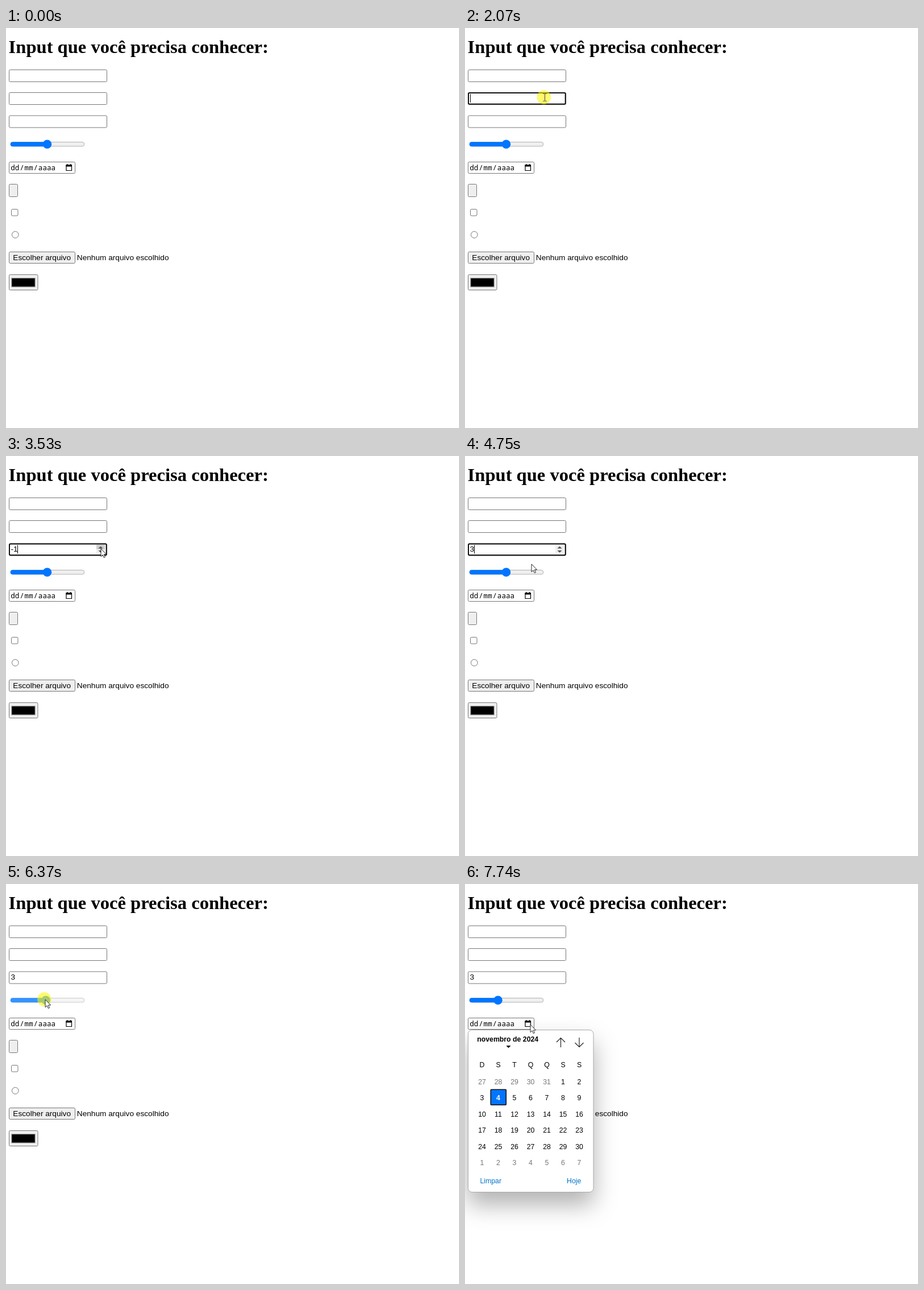
Animation of 797 by 703 pixels, one loop 8 s. Source, as an HTML page:

```html
<!DOCTYPE html>
<html lang="pt-BR">
<head>
<meta charset="utf-8">
<style>
html, body { margin: 0; width: 100%; height: 100%; overflow: hidden; background: #fff; }
svg { display: block; }
text { font: 13.67px "Liberation Sans", Arial, sans-serif; white-space: pre; }
.h1 { font: bold 32.6px "Liberation Serif", Times, serif; }
.mono { font: 12.6px "Noto Sans Mono", monospace; }
.box { fill: #fff; stroke: #767676; }
.btn { fill: #efefef; stroke: #767676; }
.focus { fill: none; stroke: #101010; stroke-width: 2; }
.cal text { font-size: 12.3px; }
.cal .bold { font-weight: bold; }
.mid { text-anchor: middle; }
.panel { fill: #fff; stroke: #a8a8a8; filter: drop-shadow(0 22px 20px rgba(0,0,0,.3)); }
.picked { fill: #0075ff; stroke: #101010; stroke-width: 1.6; }
.line { fill: none; stroke: #222; stroke-width: 1.2; }
</style>
</head>
<body>
<svg id="stage" width="797" height="703" viewBox="0 0 797 703"></svg>
<script>
const LOOP = 8000;
const FIELD_Y = [73, 113, 153.5];

const rect = (x, y, w, h, cls, r = 2, extra = '') =>
  `<rect x="${x}" y="${y}" width="${w}" height="${h}" rx="${r}" class="${cls}" ${extra}/>`;
const text = (x, y, s, cls = '', fill = '#000') =>
  `<text x="${x}" y="${y}" class="${cls}" fill="${fill}">${s}</text>`;

function page() {
  const date = ['dd', '/', 'mm', '/', 'aaaa'];
  let x = 8.3;
  const dateText = date.map(part => {
    const s = text(x, 250, part, 'mono');
    x += part.length * 7.56 + .8;
    return s;
  }).join('');
  return text(4.6, 43.5, 'Input que você precisa conhecer:', 'h1') +
    FIELD_Y.map(y => rect(5.5, y + .5, 172, 21, 'box')).join('') +
    rect(5.5, 235.5, 116, 20, 'box') + dateText +
    '<path d="M106 241.2H115.5V250.5H106Z" fill="none" stroke="#000" stroke-width="1.2"/>' +
    '<path d="M105.5 240.5H116V243.5H105.5ZM107.2 239H108.6V241H107.2ZM112.9 239H114.3V241H112.9Z"/>' +
    rect(5.5, 274.5, 15, 22, 'btn') +
    rect(9.5, 318.5, 11.5, 11.5, 'box') +
    '<circle cx="16.3" cy="363.3" r="5.8" class="box"/>' +
    rect(5.5, 393.5, 116, 20, 'btn') +
    text(12.3, 408, 'Escolher arquivo') + text(124.8, 408, 'Nenhum arquivo escolhido') +
    rect(5.5, 433.5, 50.5, 27, 'btn') +
    rect(10, 439.8, 41, 15, '', 0, 'stroke="#777"');
}

function calendar() {
  const colX = i => 30 + 28.5 * i;
  let s = rect(5.5, 256.5, 220.5, 285, 'panel', 7) +
    text(21.2, 277, 'novembro de 2024', 'bold') +
    '<path d="M72.5 284H80.5L76.5 288.3Z"/>' +
    '<path class="line" d="M168.5 287V270.5M161 278L168.5 270.5L176 278M201 270V286.5M193.5 279L201 286.5L208.5 279"/>' +
    rect(45.3, 361.3, 27, 27, 'picked', 1);
  [...'DSTQQSS'].forEach((d, i) => s += text(colX(i), 322, d, 'mid'));
  for (let i = 0; i < 42; i++) {
    const n = i - 4, inside = n > 0 && n < 31, picked = n === 4;
    const label = n < 1 ? n + 31 : n > 30 ? n - 30 : n;
    s += text(colX(i % 7), 351.5 + 28.5 * Math.floor(i / 7), label,
      picked ? 'mid bold' : 'mid', picked ? '#fff' : inside ? '#000' : '#767676');
  }
  return s + text(26.4, 525.7, 'Limpar', '', '#0074cc') + text(179, 525.7, 'Hoje', '', '#0074cc');
}

// Pointer moves: start, end, x, y; it rests in between
const MOVES = [
  [110, 860, 146, 96], [930, 1070, 137, 87], [1210, 1870, 140.5, 122],
  [2070, 2470, 142, 163], [2680, 3010, 167, 169], [3390, 3530, 167, 163],
  [4430, 4750, 117, 190], [4750, 5500, 72, 203],
  [5560, 5900, 105, 203], [5900, 6600, 57, 203], [6720, 7330, 115, 247]
];
const FOCUS_TAPS = [1200, 2070, 2610];
const DOWN_TAP = 3080;
const UP_TAPS = [0, 1, 2, 3].map(i => 3880 + 155 * i);
const DRAG_START = 5560, DRAG_END = 6720, OPEN = 7600;
const TAPS = [...FOCUS_TAPS, DOWN_TAP, ...UP_TAPS, DRAG_START, OPEN];

const clamp = v => Math.max(0, Math.min(1, v));
const count = (times, t) => times.filter(s => s <= t).length;
const within = (x, y, l, t, r, b) => x >= l && x <= r && y >= t && y <= b;
const dragging = t => t >= DRAG_START && t < DRAG_END;

function pointer(t) {
  let x = 738, y = 620;
  for (const [start, end, toX, toY] of MOVES) {
    const u = clamp((t - start) / (end - start)), k = u * u * (3 - 2 * u);
    x += (toX - x) * k;
    y += (toY - y) * k;
  }
  return [x, y];
}

function slider(t, x, y) {
  const held = dragging(t);
  const hover = within(x, y, 7, 196, 138, 212);
  const [fill, track, edge] = held ? ['#3693ff', '#f5f5f5', '#cbcbcb']
    : hover ? ['#005cc8', '#e5e5e5', '#858585'] : ['#0075ff', '#efefef', '#b2b2b2'];
  const pos = t < DRAG_START ? 72.5 : held ? x + 1 : 58;
  return rect(8, 200.5, 129.8, 7.4, '', 3.7, `fill="${track}" stroke="${edge}"`) +
    rect(7.8, 200.2, pos - 7.8, 8, '', 4, `fill="${fill}"`) +
    `<circle cx="${pos}" cy="204.2" r="7.8" fill="${fill}"/>`;
}

function spinner(x, y) {
  let s = '<path d="M159 156H174V172H159Z" fill="#efefef"/>';
  if (within(x, y, 159, 156, 174, 172))
    s += `<path d="M159 ${y < 164 ? 156 : 164}h15v8h-15Z" fill="#cecece"/>`;
  return s + '<path d="M162.3 162.5L166.5 158.8L170.7 162.5ZM162.3 166L166.5 169.7L170.7 166Z" fill="#505050"/>';
}

function fields(t, x, y) {
  const focus = t < DRAG_START ? count(FOCUS_TAPS, t) - 1 : -1;
  const value = t < DOWN_TAP ? '' : String(count(UP_TAPS, t) - 1);
  let s = text(8.4, 168.3, value);
  if (focus === 2 || within(x, y, 5, 153, 178, 175)) s += spinner(x, y);
  if (focus >= 0) {
    const top = FIELD_Y[focus], lastTap = TAPS[count(TAPS, t) - 1];
    s += rect(6, top + 1, 170.7, 19.8, 'focus');
    if (Math.floor((t - lastTap) / 500) % 2 === 0) {
      const caretX = value === '' ? 9.5 : value < 0 ? 20.5 : 16.5;
      s += `<path d="M${caretX} ${top + 3}v15" stroke="#000"/>`;
    }
  }
  return s;
}

function cursor(x, y) {
  const overText = x < 159 && FIELD_Y.some(top => within(x, y, 5, top, 178, top + 21.5));
  const shape = overText
    ? '<path d="M-3 -6.5H-.8L0 -6L.8 -6.5H3M0 -6V6M-3 6.5H-.8L0 6L.8 6.5H3" fill="none" stroke="#444"/>'
    : '<path d="M0 0V13.6L3.2 10.8L5.3 15.6L7.5 14.6L5.4 9.9H9.6Z" fill="#fff" stroke="#111" stroke-width=".9"/>';
  return `<g transform="translate(${x} ${y})">${shape}</g>`;
}

function halo(t, x, y) {
  const released = dragging(t) ? t : t < DRAG_END ? TAPS[count(TAPS, t) - 1] + 60
    : t < OPEN ? DRAG_END : OPEN + 60;
  const alpha = .57 * clamp(1 - (t - released) / 80);
  return alpha ? `<circle cx="${x - 1.7}" cy="${y - .4}" r="12.3" fill="#fff500" opacity="${alpha}"/>` : '';
}

const stage = document.getElementById('stage');
stage.innerHTML = page() + `<g id="live"></g><g id="cal" class="cal">${calendar()}</g><g id="top"></g>`;
const [live, cal, over] = ['live', 'cal', 'top'].map(id => document.getElementById(id));

function draw() {
  const t = performance.now() % LOOP;
  const [x, y] = pointer(t);
  live.innerHTML = fields(t, x, y) + slider(t, x, y) + halo(t, x, y);
  const open = clamp((t - OPEN) / 130);
  cal.style.display = open ? '' : 'none';
  cal.style.opacity = open;
  over.innerHTML = t < MOVES[0][0] ? '' : cursor(x, y);
  requestAnimationFrame(draw);
}
draw();
</script>
</body>
</html>
```
